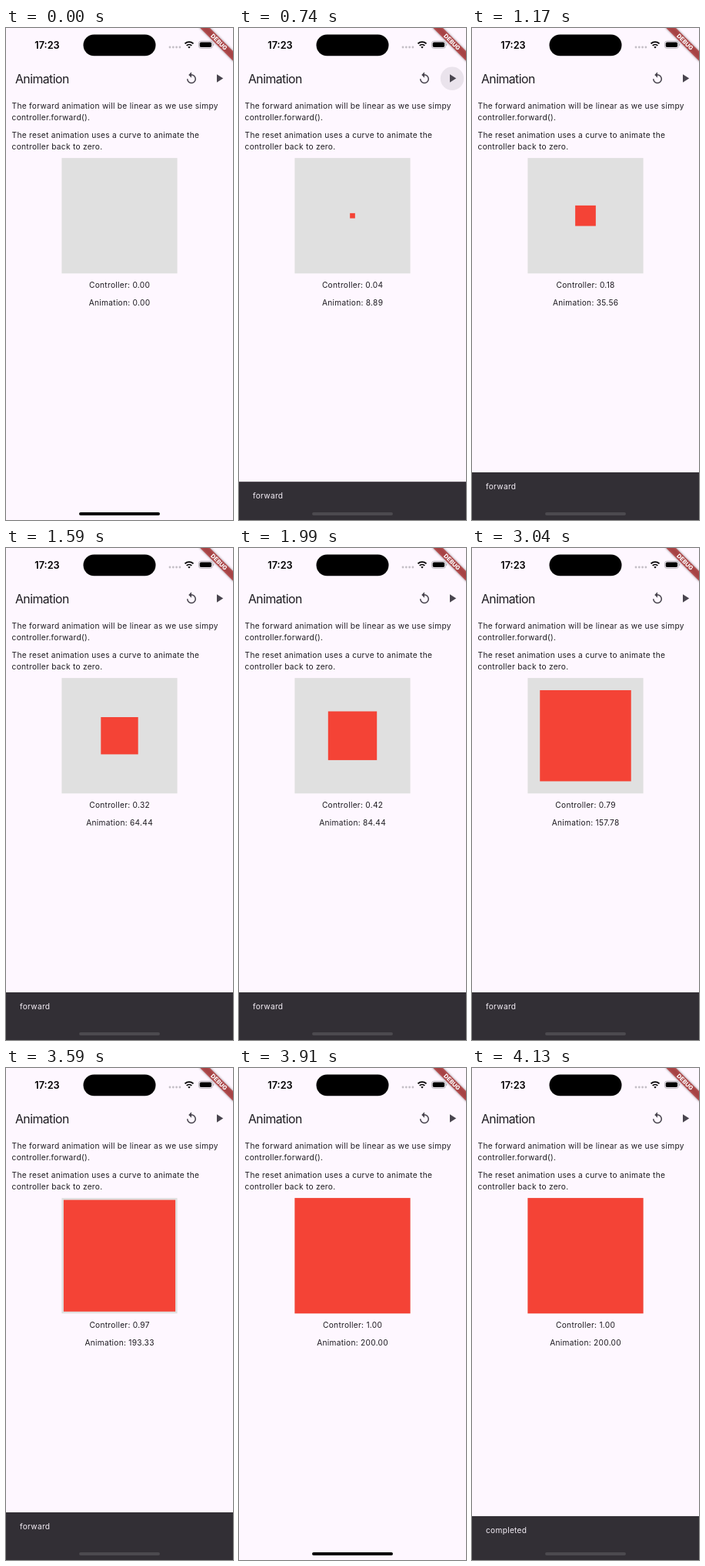
An HTML page for the animation above (8 s loop, 295 by 640 pixels).

```html
<!DOCTYPE html>
<html lang="en">
<head>
<meta charset="utf-8">
<title>Animation</title>
<style>
html, body { margin: 0; width: 100%; height: 100%; overflow: hidden; background: #fef7ff; }
svg { display: block; width: 100%; height: 100%; }
text { font-family: Inter, "Liberation Sans", sans-serif; fill: #1d1b20; }
.body { font-size: 10.2px; letter-spacing: .27px; }
.mid { text-anchor: middle; }
.title { font-size: 15.8px; letter-spacing: -.53px; }
.clock { font-size: 12.7px; font-weight: 600; fill: #000; }
.debug { font-size: 7.6px; font-weight: 800; fill: #fff; }
.icon { fill: #49454f; }
</style>
</head>
<body>
<svg viewBox="0 0 295 640" xmlns="http://www.w3.org/2000/svg">
  <defs>
    <filter id="blur" x="-20%" y="-60%" width="140%" height="220%"><feGaussianBlur stdDeviation="1.7"/></filter>
  </defs>
  <rect width="295" height="640" fill="#fef7ff"/>

  <!-- status bar -->
  <text class="clock mid" x="53.5" y="26.6">17:23</text>
  <rect x="100.5" y="8.5" width="94" height="27.7" rx="13.85"/>
  <g fill="#c4bfc6">
    <circle cx="213" cy="25" r="1.4"/><circle cx="217.3" cy="25" r="1.4"/>
    <circle cx="221.6" cy="25" r="1.4"/><circle cx="225.9" cy="25" r="1.4"/>
  </g>
  <g fill="none" stroke="#000" stroke-width="1.9">
    <path d="M232.5 20.4a7.9 7.9 0 0 1 11 0"/>
    <path d="M234.7 22.9a4.8 4.8 0 0 1 6.6 0"/>
    <path d="M238 26.6l-1.7-1.8a2.4 2.4 0 0 1 3.4 0z" fill="#000" stroke="none"/>
  </g>
  <rect x="250.4" y="17.2" width="18" height="9.2" rx="3" fill="none" stroke="#a9a4ab" stroke-width=".8"/>
  <rect x="251.7" y="18.5" width="15.4" height="6.6" rx="1.8"/>
  <path d="M269.3 20.3a1.6 1.6 0 0 1 0 3z" fill="#a9a4ab"/>

  <!-- app bar -->
  <text class="title" x="12" y="71.6">Animation</text>
  <circle id="press" cx="277" cy="65.7" r="15.2" fill="#49454f"/>
  <g class="icon">
    <path transform="translate(232 56.6) scale(.75)" d="M12 5V1L7 6l5 5V7c3.31 0 6 2.69 6 6s-2.69 6-6 6-6-2.69-6-6H4c0 4.42 3.58 8 8 8s8-3.58 8-8-3.58-8-8-8z"/>
    <path transform="translate(268 56.6) scale(.75)" d="M8 5v14l11-7z"/>
  </g>

  <!-- content -->
  <g class="body">
    <text x="7.6" y="105.1">The forward animation will be linear as we use simpy</text>
    <text x="7.6" y="120.1">controller.forward().</text>
    <text x="7.6" y="142.7">The reset animation uses a curve to animate the</text>
    <text x="7.6" y="157.7">controller back to zero.</text>
    <text id="ctrl" class="mid" x="147.6" y="338.2"></text>
    <text id="anim" class="mid" x="147.6" y="360.6"></text>
  </g>
  <rect x="72.4" y="169.1" width="150.2" height="150.2" fill="#e0e0e0"/>
  <rect id="box" fill="#f44336"/>

  <!-- snack bar -->
  <g id="bar">
    <rect width="295" height="64" fill="#322f35"/>
    <text id="note" class="body" x="18" y="22.2" style="fill:#f5eff7"></text>
  </g>
  <rect id="home" x="95" y="630" width="105" height="4" rx="2"/>

  <g transform="translate(295 0) rotate(45)">
    <rect x="-32" y="21.2" width="64" height="9" fill="#000" opacity=".45" filter="url(#blur)"/>
    <rect x="-32" y="21.2" width="64" height="9" fill="#b71c1c" opacity=".63"/>
    <text class="debug mid" x="0" y="28.4">DEBUG</text>
  </g>
</svg>
<script>
const LOOP = 8000, START = 600, TICK = 34.33, SIDE = 150.2, BAR = 62;
const HIDE = 3685, SHOW2 = 3959, SHOW1 = 589, SLIDE = 250;
// moments at which the screen refreshes
const steps = [0, 500, 620, 740, 840, 950, 1060, 1160, 1270, 1370, 1480, 1590, 1690,
  1790, 1900, 2000, 2100, 2220, 2330, 2450, 2570, 2690, 2800, 2920, 3040, 3160,
  3270, 3380, 3480, 3590, 3700, 3810, 3910, 4020, 4130];

const el = id => document.getElementById(id);
const [press, ctrl, anim, box, bar, note, home] =
  ["press", "ctrl", "anim", "box", "bar", "note", "home"].map(el);
const clamp = x => Math.max(0, Math.min(1, x));
const quart = x => x < .5 ? 8 * x ** 4 : 1 - 8 * (1 - x) ** 4;

function set(node, attrs) {
  for (const k in attrs) node.setAttribute(k, attrs[k]);
}

function snack(t) {
  if (t >= SHOW2) {
    const p = clamp((t - SHOW2) / SLIDE);
    return { text: "completed", p, fade: clamp((p - .4) / .2) };
  }
  if (t >= HIDE) {
    const p = 1 - clamp((t - HIDE) / SLIDE);
    return { text: "forward", p, fade: clamp((p - .72) / .28) };
  }
  const p = clamp((t - SHOW1) / SLIDE);
  return { text: "forward", p, fade: clamp((p - .4) / .2) };
}

function draw(time) {
  const t = steps.findLast(s => s <= time);

  const v = clamp(Math.round((t - START) / TICK) / 90);
  const w = SIDE * v;
  set(box, { x: 147.5 - w / 2, y: 244.2 - w / 2, width: w, height: w });
  ctrl.textContent = "Controller: " + v.toFixed(2);
  anim.textContent = "Animation: " + (v * 200).toFixed(2);

  const glow = t < 500 ? 0 : Math.min(clamp((t - 400) / 200), clamp((1000 - t) / 250));
  set(press, { opacity: .11 * glow });

  const s = snack(t), h = BAR * quart(s.p);
  set(bar, { transform: `translate(0 ${640 - h})`, visibility: h < .3 ? "hidden" : "visible" });
  note.textContent = s.text;
  set(note, { opacity: s.fade });
  set(home, { fill: h > 10 ? "#4c4a4f" : "#000" });
}

const begin = performance.now();
function frame() {
  draw((performance.now() - begin) % LOOP);
  requestAnimationFrame(frame);
}
frame();
</script>
</body>
</html>
```
